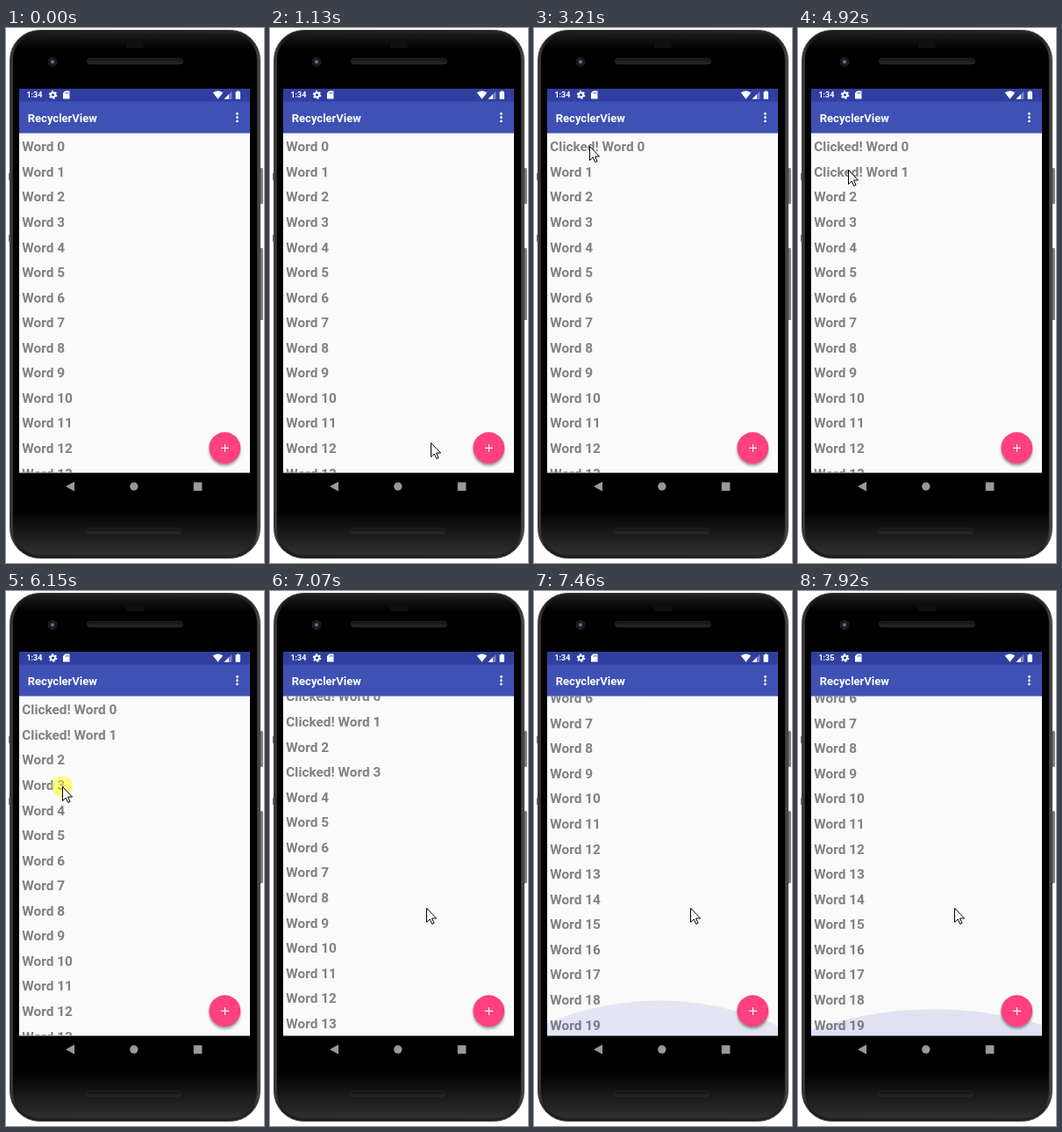
An HTML page for the animation above (7.99 s loop, 294x608 px).

```html
<!DOCTYPE html>
<html lang="en">
<head>
<meta charset="utf-8">
<title>RecyclerView</title>
<style>
  html, body { margin: 0; width: 100%; height: 100%; overflow: hidden; background: #fff; }
  svg { display: block; width: 294px; height: 608px; }
  text { font-family: Roboto, sans-serif; white-space: pre; }
  .row { font-size: 15.36px; font-weight: 700; fill: #808080; }
  .title { font-size: 13px; font-weight: 600; fill: #fff; }
  .clock { font-size: 9px; font-weight: 700; fill: #fff; }
</style>
</head>
<body>
<svg viewBox="0 0 294 608">
  <defs>
    <clipPath id="listClip"><rect x="15" y="119.5" width="263" height="386"/></clipPath>
    <linearGradient id="rim">
      <stop offset="0" stop-color="#3c3c3c"/>
      <stop offset=".03" stop-color="#1c1c1c"/>
      <stop offset=".97" stop-color="#242424"/>
      <stop offset="1" stop-color="#4c4c4c"/>
    </linearGradient>
    <linearGradient id="glass" x2="0" y2="1">
      <stop offset="0" stop-color="#1c1c1c"/>
      <stop offset=".03" stop-color="#000"/>
      <stop offset=".91" stop-color="#000"/>
      <stop offset="1" stop-color="#303030"/>
    </linearGradient>
    <linearGradient id="key">
      <stop offset="0" stop-color="#555"/>
      <stop offset="1" stop-color="#8c8c8c"/>
    </linearGradient>
    <linearGradient id="slot" x2="0" y2="1">
      <stop offset="0" stop-color="#111"/>
      <stop offset="1" stop-color="#282828"/>
    </linearGradient>
    <filter id="blur" x="-50%" y="-50%" width="200%" height="200%"><feGaussianBlur stdDeviation="1.8"/></filter>
  </defs>

  <!-- Phone body -->
  <g fill="url(#key)">
    <rect x="287" y="159" width="6" height="41" rx="1.5"/>
    <rect x="287" y="250" width="6" height="82" rx="1.5"/>
  </g>
  <path d="M3.5 165v8M3.5 235v8" stroke="#777"/>
  <rect x="4.5" y="2.5" width="285" height="600" rx="34" fill="url(#rim)" stroke="#444"/>
  <rect x="8" y="6" width="278" height="593" rx="30" fill="url(#glass)"/>
  <rect x="137" y="15" width="20" height="8" rx="3" fill="#101012"/>
  <g fill="url(#slot)" stroke="#262626" stroke-width=".8">
    <rect x="92.5" y="34.5" width="109" height="6.5" rx="3"/>
    <rect x="90.5" y="568.5" width="109" height="6" rx="3"/>
  </g>
  <circle cx="53" cy="38.5" r="5.5" fill="#1b1c22"/>
  <circle cx="53" cy="38.5" r="2" fill="#6a6e88"/>

  <!-- Screen -->
  <rect x="15" y="69" width="263" height="436.5" fill="#fafafa"/>
  <g clip-path="url(#listClip)">
    <g id="list"></g>
    <ellipse id="glow" fill="#3f51b5"/>
  </g>
  <rect x="15" y="83" width="263" height="36.5" fill="#3f51b5"/>
  <rect x="15" y="69" width="263" height="14.5" fill="#303f9f"/>
  <text class="title" x="24.8" y="106.7">RecyclerView</text>
  <text class="clock" id="clock" x="23.4" y="79.4">1:34</text>
  <g fill="#fff">
    <circle cx="53.5" cy="76" r="2.6" fill="none" stroke="#fff" stroke-width="2"/>
    <circle cx="53.5" cy="76" r="4" fill="none" stroke="#fff" stroke-width="1.6" stroke-dasharray="2.1 2.09"/>
    <path d="M67.5 71.5H72.5V80.5H65V74Z"/>
    <path d="M68 73v1.8M69.6 73v1.8M71.1 73v1.8" stroke="#303f9f" stroke-width=".7"/>
    <path d="M235.8 73.6Q241.5 69.6 247.2 73.6L241.5 80.8Z"/>
    <path d="M257.5 71.8V80.8H248.5Z" opacity=".35"/>
    <path d="M254 75.3V80.8H248.5Z"/>
    <path d="M263 71.5h2.6v1h1.4v8.3h-5.4v-8.3h1.4z"/>
    <circle cx="263.5" cy="97.5" r="1.4"/>
    <circle cx="263.5" cy="101.7" r="1.4"/>
    <circle cx="263.5" cy="105.9" r="1.4"/>
  </g>
  <circle cx="249.3" cy="479.6" r="17.9" opacity=".38" filter="url(#blur)"/>
  <circle cx="249.3" cy="477.2" r="17.9" fill="#ff4081"/>
  <path d="M245 477.4h9M249.5 473v9" stroke="#fff" stroke-width="1.1"/>
  <g fill="#999">
    <path d="M68 521L78 515.5V526.5Z"/>
    <circle cx="145.8" cy="521" r="4.7"/>
    <rect x="213.8" y="516.3" width="9.6" height="9.6"/>
  </g>

  <circle id="halo" r="12" fill="#ff0" opacity=".47"/>
  <path id="cursor" d="M.5 .5V16.5L4.2 13L6.8 18.5L9 17.5L6.5 12H11.5Z" fill="#fff" stroke="#000"/>
</svg>
<script>
const LOOP = 7990, ROW = 28.56, MAX_SCROLL = 184.4, LIST_BOTTOM = 505.5;
// Overscroll glow: circle radius and its full visible height
const GLOW_RADIUS = 263 * .6 / Math.sin(Math.PI / 6);
const GLOW_HEIGHT = GLOW_RADIUS * (1 - Math.cos(Math.PI / 6));
const $ = id => document.getElementById(id);

// Pointer moves: start, end, steps, points, easing power
const moves = [
  [750, 1520, 11, [[235, 607], [112, 284]], 1.25],
  [1590, 2350, 11, [[112, 284], [79, 162]], 1],
  [2430, 2660, 4, [[79, 162], [63, 134]], 1],
  [3910, 4520, 9, [[63, 134], [57, 161]], 1],
  [5300, 6000, 10, [[57, 161], [52, 190], [64, 222]], 1],
  [6530, 6920, 6, [[64, 222], [178, 360]], 1]
];
// Clicks: row, press, release, label settled
const clicks = [[0, 3060, 3140, 3210], [1, 4690, 4840, 4920], [3, 6150, 6210, 6210]];

// Scroll offsets, then glow as [depth, opacity, centre], one entry per step
const scrolls = [14.8, 60, 115, 163, MAX_SCROLL];
const glows = [[22, .08, 141], [40, .12, 143], [42, .15, 146], [42, .16, 148],
  [39, .16, 150], [36, .155, 152], [33, .15, 154], [30, .14, 155]];

function addText(label, row) {
  const el = document.createElementNS("http://www.w3.org/2000/svg", "text");
  set(el, { class: "row", x: 18.3, y: 140.3 + row * ROW });
  el.textContent = label;
  return $("list").appendChild(el);
}
const rows = Array.from({ length: 20 }, (_, i) => addText("Word " + i, i));
const clicked = clicks.map(([row]) => addText("Clicked! Word " + row, row));

function set(el, attrs) {
  for (const name in attrs) el.setAttribute(name, attrs[name]);
}

// Number of steps already taken at time t
function stepAt(t, start, end, count) {
  if (t < start) return 0;
  return Math.min(count, Math.floor((t - start) / (end - start) * (count - 1) + .15) + 1);
}

function along(points, p) {
  const s = p * (points.length - 1), i = Math.min(points.length - 2, Math.floor(s));
  return [0, 1].map(k => points[i][k] + (points[i + 1][k] - points[i][k]) * (s - i));
}

function pointerAt(t) {
  const move = moves.filter(m => t >= m[0]).pop();
  if (!move) return null;
  const [start, end, count, points, power] = move;
  const k = stepAt(t, start, end, count);
  const p = move === moves[0] ? (k - 1) / (count - 1) : k / count;
  return along(points, p ** power).map(Math.round);
}

function draw(t) {
  const tip = pointerAt(t);
  $("cursor").style.display = tip ? "" : "none";
  if (tip) {
    set($("cursor"), { transform: `translate(${tip})` });
    set($("halo"), { cx: tip[0], cy: tip[1] });
  }
  const pressed = clicks.some(([, press, release]) => t >= press && t < release);
  $("halo").style.display = pressed ? "" : "none";

  clicks.forEach(([row, , release, settled], i) => {
    const mix = t < release ? 0 : t < settled ? .5 : 1;
    clicked[i].style.opacity = mix;
    rows[row].style.opacity = 1 - mix;
  });

  const k = stepAt(t, 7070, 7840, 11) + (t >= 7920 ? 1 : 0);
  const offset = k ? scrolls[Math.min(k, scrolls.length) - 1] : 0;
  set($("list"), { transform: `translate(0 ${-offset})` });

  const [depth, opacity, cx] = glows[k - 5] || [0, 0, 146];
  const ry = GLOW_RADIUS * depth / GLOW_HEIGHT;
  set($("glow"), { cx, cy: LIST_BOTTOM - depth + ry, rx: GLOW_RADIUS, ry, opacity });
  $("clock").textContent = t < 7920 ? "1:34" : "1:35";
}

const began = performance.now();
function frame() {
  draw((performance.now() - began) % LOOP);
  requestAnimationFrame(frame);
}
frame();
</script>
</body>
</html>
```
